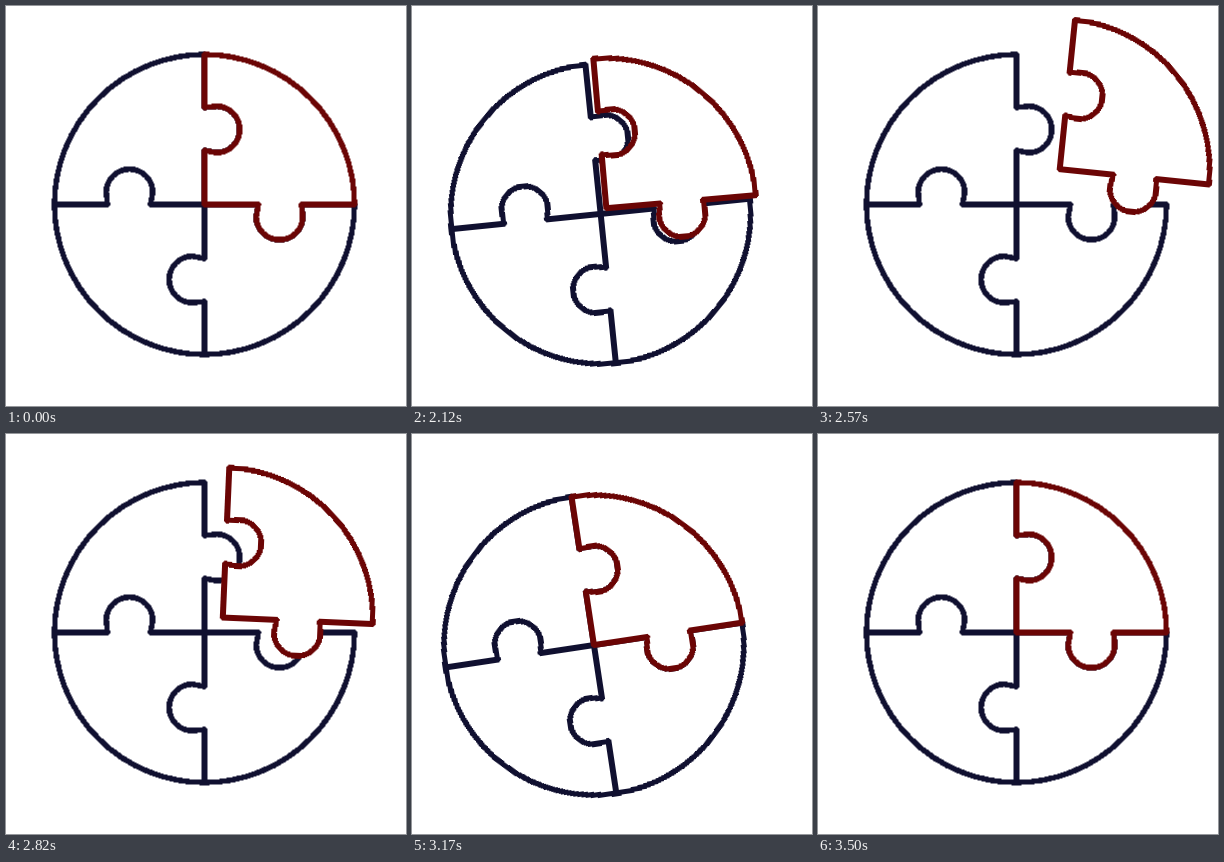
Write an HTML page that moves like this. It is 400x400 px and loops after 3520 ms.

```html
<!DOCTYPE html>
<html lang="en">
<head>
<meta charset="utf-8">
<title>Puzzle</title>
<style>
  html, body { margin: 0; width: 100%; height: 100%; overflow: hidden; background: #fff; }
  svg { display: block; width: 100%; height: 100%; shape-rendering: crispEdges; }
  g { fill: none; stroke-width: 5.5; stroke-linecap: round; stroke-linejoin: round; }
  #puzzle { stroke: #101030; }
  #piece { stroke: #6b0505; fill: #fff; }
</style>
</head>
<body>
<svg viewBox="-198.5 -198.5 400 400">
  <defs>
    <path id="spoke" d="M0 -150V-97L12 -98.3A23.3 23.3 0 0 1 12 -51.7L0 -54V0"/>
  </defs>
  <g id="puzzle">
    <path d="M0 -150A150 150 0 1 0 150 0"/>
    <use href="#spoke"/>
    <use href="#spoke" transform="rotate(90)"/>
    <use href="#spoke" transform="rotate(180)"/>
    <use href="#spoke" transform="rotate(270)"/>
    <path id="piece" d="M0 0V-54L12 -51.7A23.3 23.3 0 0 0 12 -98.3L0 -97V-150
      A150 150 0 0 1 150 0H97L98.3 12A23.3 23.3 0 0 1 51.7 12L54 0Z"/>
  </g>
</svg>
<script>
const LOOP = 3520, REST = 2020, STEP = 25, STEPS = 60;
const SMOOTH = 'cubic-bezier(.333,0,.667,1)';

// Rows: step, x, y, angle, easing towards the next row
const puzzleKeys = [
  [0, 0, 0, 0, 'cubic-bezier(.167,.167,.667,1)'],
  [4, -11, 10.5, -6.5, SMOOTH],
  [9, 0, 0, 0],
  [38, 0, 0, 0, SMOOTH],
  [45, -18.5, 14, -9.6, 'cubic-bezier(.2,0,.5,1)'],
  [60, 0, 0, 0]
];
const pieceKeys = [
  [0, 0, 0, 0],
  [4, 0, 0, 0, 'cubic-bezier(.25,.6,.4,1)'],
  [21, 44.3, -36.2, 6, SMOOTH],
  [42.5, 0, 0, 0],
  [60, 0, 0, 0]
];

function track(id, keys) {
  const frames = keys.map(([step, x, y, angle, easing = 'linear']) => ({
    offset: step / STEPS,
    transform: `translate(${x}px, ${y}px) rotate(${angle}deg)`,
    easing
  }));
  const anim = document.getElementById(id)
    .animate(frames, { duration: STEPS * STEP, fill: 'both' });
  anim.pause();
  return anim;
}

const tracks = [track('puzzle', puzzleKeys), track('piece', pieceKeys)];

// Steps alternate between 30 and 20 ms
function stepAt(time) {
  const t = time % LOOP - REST;
  return t < 0 ? 0 : 1 + 2 * Math.floor(t / 50) + (t % 50 >= 30 ? 1 : 0);
}

function draw() {
  const time = stepAt(performance.now()) * STEP;
  for (const anim of tracks) anim.currentTime = time;
  requestAnimationFrame(draw);
}
draw();
</script>
</body>
</html>
```
